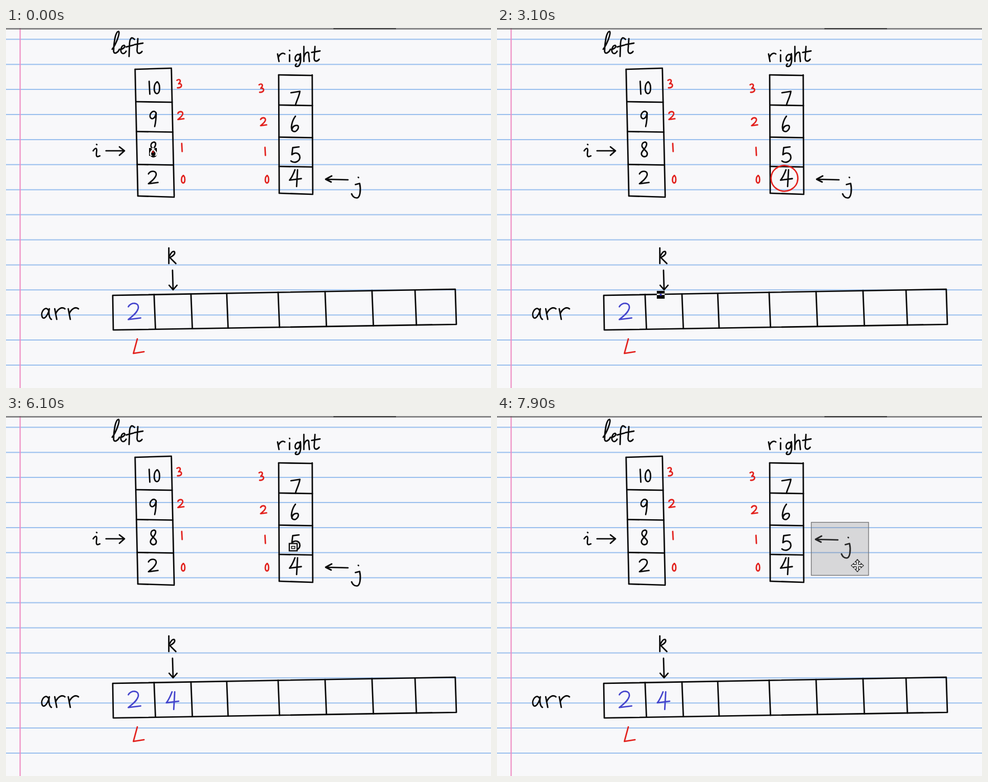
An HTML page that plays this animation: 868x645 px, repeating every 8000 ms.

```html
<!DOCTYPE html>
<html lang="en">
<head>
<meta charset="utf-8">
<title>Merging two lists</title>
<style>
  html, body { margin: 0; width: 100%; height: 100%; overflow: hidden; background: #f8f8fa; }
  svg { display: block; width: 868px; height: 645px; }
  .ink { fill: none; stroke: #0a0a0a; stroke-width: 2.6; stroke-linecap: round; stroke-linejoin: round; }
  .red { stroke: #e2211d; }
  .blue { stroke: #4444cc; }
  #pen { fill: #fff; mix-blend-mode: difference; }
</style>
</head>
<body>
<svg viewBox="0 0 868 645">
  <rect width="868" height="645" fill="#f8f8fa"/>
  <path id="rules" fill="none" stroke="#9fc2ee" stroke-width="2"/>
  <path d="M25.3 0V645" stroke="#ee8cc2" stroke-width="2"/>
  <path d="M0 1.4H868" stroke="#626262" stroke-width="2"/>
  <path d="M586 1.2H698" stroke="#3c3c3c" stroke-width="2"/>

  <g id="black" class="ink">
    <path d="M179 220H211M203 213L212 220L203 228M298 434L299 468M292 461L299 469L306 461"/>
    <g id="jMark"><path d="M612 272L573 271M583 265L572 271L582 276"/></g>
  </g>
  <g id="red" class="ink red">
    <path d="M235 557L228 583L247 580"/>
    <path id="ring" d="M526 289.5A24 23 0 1 0 525 290"/>
  </g>
  <g id="blue" class="ink blue"></g>

  <rect id="box" x="562.5" y="190.5" stroke="#747476" stroke-width="1.3"/>
  <rect id="pen" x="-7" y="-7" width="14" height="14"/>
  <circle id="dot" r="2"/>
  <g id="eraser" stroke="#0c0c0c" fill="#fafafa">
    <rect x="-7" y="-6.5" width="14" height="13" stroke-width="2.2"/>
    <rect x="-3" y="-1.5" width="6" height="4" stroke-width="1.4"/>
  </g>
  <path id="arrow" d="M0 0V16L4 12.5L7 19L10 17.5L7 11.5H12Z" fill="#fff" stroke="#222" stroke-width="1.1"/>
  <g id="move" fill="#fff" stroke="#222" stroke-width="1.2"></g>
</svg>
<script>
const LOOP = 8000, TICK = 100;
const $ = id => document.getElementById(id);
const part = (t, a, b) => Math.min(1, Math.max(0, (t - a) / (b - a)));
const ease = k => k * k * (3 - 2 * k);
const show = (el, on) => el.setAttribute('display', on ? 'inline' : 'none');

function stroke(parent, d) {
  const el = document.createElementNS('http://www.w3.org/2000/svg', 'path');
  el.setAttribute('d', d);
  return parent.appendChild(el);
}

// handwriting: width, height, strokes on a 10 x 10 grid
const PEN = {
  0: [13, 21, 'M6 0C0 1 0 10 5 10C10 10 10 1 5 0'],
  1: [4, 23, 'M3 0L6 10'],
  2: [17, 22, 'M0 2C2 -1 9 -1 8 3C7 6 3 8 0 10L10 9'],
  3: [16, 25, 'M0 1C4 -1 9 1 3 5C10 4 10 10 1 9.5'],
  4: [21, 30, 'M4.6 0C3 3 2 4.5 0 6.2L10 5.3M6.8 0L6 10'],
  5: [16, 28, 'M9 0L2 .5L1 5C5 3 10 4 10 7C9 10 3 10.5 0 9'],
  6: [16, 28, 'M5 0C1 3 -1 8 2 9.5C6 11 10 7 7.5 6C4 5.5 1 7 1 9'],
  7: [16, 25, 'M0 1L10 0C9 4 6 7 5 10'],
  8: [14, 27, 'M8 1C5 -1 0 2 3 4C6 6 11 7 8 9.5C4 11 0 9 2 7C4 5 9 3.5 8 1'],
  9: [13, 27, 'M9 1C5 -2 -1 2 1 4C4 6 8 4 9 1C9 5 8 8 7 10'],
  l: [13, 40, 'M0 8C5 6 11 1 9 0C4 0 2 6 2 9C3 10.5 8 9.5 10 8'],
  e: [12, 15, 'M0 5C6 5 10 1 7 0C3 0 0 7 4 9.5C6 10.5 9 9 10 7'],
  f: [15, 34, 'M10 1C6 -1 4 1 4 4L3.5 10M0 5L9 4'],
  t: [15, 27, 'M4 0L3 8C3.5 10.5 7 10 9 8.5M0 4L10 3'],
  r: [13, 15, 'M0 1L2 10M1 5C3 1 7 -1 10 1'],
  '!': [9, 20, 'M5 4L5 10M5 0L5.3 .3'],
  i: [12, 23, 'M0 5C4 2 6 3 5 6C4 10 6 10 10 9M5 0L5.5 .2'],
  g: [12, 23, 'M8 1C2 -1 -1 5 3 5.5C7 6 9 3 9 0C10 4 10 10 4 10C1 10 1 9 3 8'],
  h: [11, 27, 'M1 0L1 10M1 7C4 3 10 3 9 6L10 10'],
  a: [13, 15, 'M7 2C4 -2 -1 4 1 8C3 11 7 6 8 1C7 5 8 9 10 10'],
  k: [14, 28, 'M1 0L1 10M2 5C6 1 10 2 8 4C7 5 3 6 2 6L10 10'],
  j: [17, 37, 'M4 3.5L8.5 3C10 6 9 10 5.5 10C2 10 1 9 0 8M7 0L7.3 .1']
};
const DROP = { f: 5, g: 9 };

// one sign around a centre point
function sign(parent, ch, cx, cy, scale = 1) {
  const [w, h, d] = PEN[ch];
  const fit = (_, x, y) => `${cx + (x / 10 - 0.5) * w * scale} ${cy + (y / 10 - 0.5) * h * scale}`;
  return d.split(/(?=M)/).map(s => stroke(parent, s.replace(/(-?[\d.]+) (-?[\d.]+)/g, fit)));
}

function word(text, x, base, gap, scale = 1) {
  for (const ch of text) {
    const [w, h] = PEN[ch];
    sign($('black'), ch, x + w * scale / 2, base + ((DROP[ch] || 0) - h / 2) * scale, scale);
    x += w * scale + gap;
  }
}

// a column of cells with a number in each, lowest last
function stack(x, w, lean, edges, numbers, centres) {
  const last = edges.length - 1;
  const side = i => x + lean * i / last;
  edges.forEach((y, i) => stroke($('black'), `M${side(i)} ${y}L${side(i) + w} ${y + (i < last ? 1 : 2) - (lean > 3 && !i ? 3 : 0)}`));
  for (const dx of [0, w]) stroke($('black'), `M${x + dx} ${edges[0]}L${side(last) + dx} ${edges[last]}`);
  numbers.forEach((n, i) => {
    const digits = [...String(n)];
    digits.forEach((ch, k) => sign($('black'), ch, x + w / 2 + (k - (digits.length - 1) / 2) * 13, centres[i]));
  });
}

$('rules').setAttribute('d', Array.from({ length: 14 }, (_, i) => `M0 ${20.3 + i * 44.9}H868`).join(''));

word('left', 190, 46, 0);
word('r!ght', 486, 60, 4);
word('arr', 63, 522, 6, 1.4);
sign($('black'), 'k', 297, 408);
sign($('black'), 'i', 162, 220);
sign($('jMark'), 'j', 627, 286);
stack(231, 65, 5, [74, 132, 185.5, 244.5, 301], [10, 9, 8, 2], [107, 163, 217, 268]);
stack(488, 60, 1, [84, 138, 195.5, 248, 296], [7, 6, 5, 4], [126, 172, 227, 269]);
[271, 221, 168, 108].forEach((y, n) => {
  sign($('red'), n, 317 - 2 * n, 271 - 57 * n, 0.63);
  sign($('red'), n, 467 - 3 * n, y, 0.63);
});

const topY = x => 479 - (x - 191) * 0.018, lowY = x => 541 - (x - 191) * 0.0163;
stroke($('black'), `M191 ${topY(191)}L804 ${topY(804)}L806 ${lowY(806)}L192 ${lowY(192)}Z`);
for (const x of [265, 331, 395, 487, 571, 655, 732])
  stroke($('black'), `M${x} ${topY(x)}L${x + 2.5} ${lowY(x)}`);

sign($('blue'), 2, 230, 508, 1.3);
const four = sign($('blue'), 4, 298, 510, 1.05);

for (let a = 0; a < 360; a += 90)
  stroke($('move'), 'M-1.6 -2V-6.5H-4L0 -11L4 -6.5H1.6V-2').setAttribute('transform', `rotate(${a})`);

// strokes drawn live: start, end, time of erasing
const live = [[$('ring'), 1100, 1850, 5800], [four[0], 3400, 3900, LOOP], [four[1], 4000, 4200, LOOP]]
  .map(([el, from, to, gone]) => ({ el, from, to, gone, len: el.getTotalLength() }));

// cursor stops: time, x, y; the toolbar lies above the stage
const BAR = [90, -25];
const ROUTE = [
  [0, 263, 222], [1100, 526, 290], [2000, 526, 290], [2400, ...BAR], [2800, ...BAR],
  [3100, 293, 478], [3400, 299, 495], [4200, 300, 525], [4500, 312, 500], [4800, 312, 500],
  [5200, ...BAR], [5400, ...BAR], [5900, 514, 235], [6100, 514, 235], [6400, ...BAR],
  [6600, ...BAR], [6900, 592, 262], [7100, 564, 240], [7400, 667, 336], [7500, 645, 318],
  [7600, 645, 318], [7900, 645, 268]
];

function cursorAt(t) {
  const s = live.find(s => t >= s.from && t <= s.to);
  if (s) {
    const p = s.el.getPointAtLength(s.len * part(t, s.from, s.to));
    return [p.x, p.y];
  }
  const i = Math.max(1, ROUTE.findIndex(stop => stop[0] >= t));
  const [a, ax, ay] = ROUTE[i - 1], [b, bx, by] = ROUTE[i];
  const k = ease(part(t, a, b));
  return [ax + (bx - ax) * k, ay + (by - ay) * k];
}

function toolAt(t) {
  if (t < 5250) return 'pen';
  if (t < 6450) return 'eraser';
  return t < 7450 ? 'arrow' : 'move';
}

function draw(ms) {
  let tick = Math.floor((ms % LOOP) / TICK);
  if ((2 * tick + 3) % 11 < 2) tick--;   // every 5.5 ticks the picture holds
  const t = tick * TICK;

  for (const s of live) {
    const k = part(t, s.from, s.to);
    show(s.el, k > 0 && t < s.gone);
    s.el.setAttribute('stroke-dasharray', k < 1 ? `${s.len * k} ${s.len * 2}` : 'none');
  }

  const drag = ease(part(t, 7600, 7900)), size = ease(part(t, 7100, 7400));
  const box = $('box'), held = t > 7450;
  $('jMark').setAttribute('transform', `translate(${-2 * drag} ${-50 * drag})`);
  box.setAttribute('transform', `translate(${2 - 2 * drag} ${50 - 50 * drag})`);
  box.setAttribute('width', 102.5 * size);
  box.setAttribute('height', 95 * size);
  box.setAttribute('fill', held ? 'rgba(120,120,122,.26)' : 'none');
  box.setAttribute('stroke-dasharray', held ? 'none' : '3 3');
  show(box, size > 0);

  const [x, y] = cursorAt(t), tool = toolAt(t);
  for (const id of ['pen', 'dot', 'eraser', 'arrow', 'move']) {
    show($(id), id === tool || (id === 'dot' && tool === 'pen'));
    $(id).setAttribute('transform', `translate(${x} ${y})`);
  }
  $('dot').setAttribute('fill', t < 2600 ? '#b01818' : '#3030b0');
}

const start = performance.now();
function frame(now) {
  draw(Math.max(0, now - start));
  requestAnimationFrame(frame);
}
draw(0);
requestAnimationFrame(frame);
</script>
</body>
</html>
```
